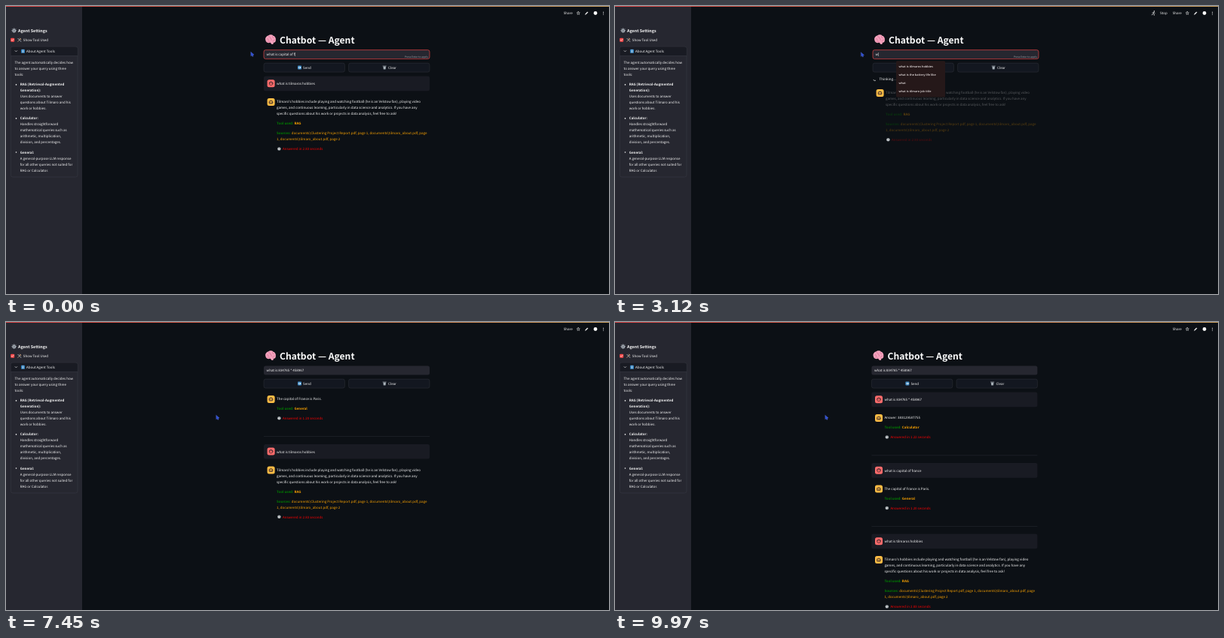
Write an HTML page with a canvas that moves like this. It is 800 by 384 pixels and loops after 10 s.

```html
<!DOCTYPE html>
<html lang="en">
<head>
<meta charset="utf-8">
<title>Chatbot — Agent</title>
<style>
html, body { margin: 0; width: 100%; height: 100%; overflow: hidden; background: #0c1015; }
canvas { display: block; width: 800px; height: 384px; }
</style>
</head>
<body>
<canvas id="stage"></canvas>
<script>
const LOOP = 10000;
const FACE = '"Noto Sans CJK JP", "Noto Sans CJK SC", "Noto Sans CJK KR", "Open Sans", sans-serif';
const FACE_SCALE = 1.117;
const WHITE = '#fafafa', PANEL = '#262730', RED = '#ff4b4b', GREEN = '#008000', ORANGE = '#ffa500';

const canvas = document.getElementById('stage');
const ctx = canvas.getContext('2d');
const ratio = window.devicePixelRatio || 1;
canvas.width = 800 * ratio;
canvas.height = 384 * ratio;

// ---------- timeline ----------
const RUNS = [
  { click: 1350, busy: 1850, fade: 1900, think: 2300, answer: 3450 },
  { click: 6950, busy: 8100, fade: 8050, think: 8900, answer: 9300 }
];
const REFOCUS = 2750, RETYPE = 3100;
const KEYS = [
  { start: 150, step: 150, before: 'what is capital of f', text: 'rance' },
  { start: RETYPE, step: 130, before: '', text: 'what is ' },
  { start: 4330, step: 120, before: 'what is ', text: '834765 ' },
  { start: 5400, step: 120, before: 'what is 834765 ', text: '* 458967' }
];
const POINTER = [
  [0, 325, 61.5], [1000, 325, 61.5], [1350, 428, 77], [1520, 430.5, 73.5], [1900, 430.5, 73.5],
  [2650, 326.5, 62], [6450, 326.5, 62], [6900, 398, 80], [7000, 398, 80], [7380, 279, 124.5]
];
const SUGGESTIONS = ['what is tilmaros hobbies', 'what is the battery life like', 'what', 'what is tilmaro job title'];

const CALC = { q: 'what is 834765 * 458967', a: ['Answer: 383129587755'], tool: 'Calculator', secs: '1.22' };
const FRANCE = { q: 'what is capital of france', a: ['The capital of France is Paris.'], tool: 'General', secs: '1.20' };
const HOBBY = {
  q: 'what is tilmaros hobbies',
  a: ['Tilmaro\'s hobbies include playing and watching football (he is an Velstow fan), playing video',
      'games, and continuous learning, particularly in data science and analytics. If you have any',
      'specific questions about his work or projects in data analysis, feel free to ask!'],
  tool: 'RAG',
  sources: ['documents\\Clustering Project Report.pdf, page 1, documents\\tilmaro_about.pdf, page',
            '1, documents\\tilmaro_about.pdf, page 2'],
  secs: '2.83'
};

const clamp = v => Math.max(0, Math.min(1, v));
const ease = v => v * v * (3 - 2 * v);

function typedAt(t) {
  let value = KEYS[0].before;
  for (const k of KEYS) {
    if (t >= k.start) value = k.before + k.text.slice(0, Math.floor((t - k.start) / k.step) + 1);
  }
  return value;
}

function pointerAt(t) {
  const i = POINTER.findIndex(p => p[0] > t);
  if (i < 0) return POINTER[POINTER.length - 1].slice(1);
  const [t0, x0, y0] = POINTER[i - 1], [t1, x1, y1] = POINTER[i];
  const k = ease((t - t0) / (t1 - t0));
  return [x0 + (x1 - x0) * k, y0 + (y1 - y0) * k];
}

// ---------- drawing helpers ----------
// Text is set ten times larger and scaled down, so advances stay fractional.
function text(str, x, y, { size = 5, color = WHITE, bold = false, align = 'left', font } = {}) {
  ctx.save();
  ctx.translate(x, y + size * 0.34);
  ctx.scale(0.1, 0.1);
  ctx.font = font || `${bold ? 700 : 400} ${size * 10 / FACE_SCALE}px ${FACE}`;
  ctx.textRendering = 'geometricPrecision';
  ctx.textAlign = align;
  ctx.fillStyle = color;
  ctx.fillText(str, 0, 0);
  const width = ctx.measureText(str).width / 10;
  ctx.restore();
  return width;
}

function box(x, y, w, h, r, fill, stroke, line = 0.4) {
  ctx.beginPath();
  ctx.roundRect(x, y, w, h, r);
  if (fill) { ctx.fillStyle = fill; ctx.fill(); }
  if (stroke) { ctx.strokeStyle = stroke; ctx.lineWidth = line; ctx.stroke(); }
}

function dot(x, y, r, fill) {
  ctx.beginPath();
  ctx.arc(x, y, r, 0, 7);
  ctx.fillStyle = fill;
  ctx.fill();
}

function path(d, x, y, { fill, stroke, line = 0.5 }) {
  ctx.save();
  ctx.translate(x, y);
  const p = new Path2D(d);
  ctx.lineCap = ctx.lineJoin = 'round';
  if (fill) { ctx.fillStyle = fill; ctx.fill(p); }
  if (stroke) { ctx.strokeStyle = stroke; ctx.lineWidth = line; ctx.stroke(p); }
  ctx.restore();
}

function star(x, y) {
  let d = '';
  for (let i = 0; i < 10; i++) {
    const r = i % 2 ? 1 : 2.2, a = i * Math.PI / 5;
    d += (i ? 'L' : 'M') + r * Math.sin(a) + ' ' + -r * Math.cos(a);
  }
  path(d + 'Z', x, y, { stroke: WHITE });
}

function gear(x, y) {
  for (let i = 0; i < 8; i++) {
    const a = i * Math.PI / 4, c = Math.cos(a), s = Math.sin(a);
    path(`M${1.8 * c} ${1.8 * s}L${2.8 * c} ${2.8 * s}`, x, y, { stroke: '#c3ccd4', line: 0.9 });
  }
  path('M1.7 0A1.7 1.7 0 1 1 -1.7 0A1.7 1.7 0 1 1 1.7 0', x, y, { stroke: '#c3ccd4', line: 1 });
  dot(x, y, 0.6, '#c3ccd4');
}

function brain(x, y) {
  path('M-6.6 1C-7.6 -2 -5.5 -4.6 -3.2 -5.2C-1 -7 2 -6.6 3.3 -5.4C6 -4.8 7.3 -2 6.9 .6' +
       'C7.2 3 5 4.2 3.8 4C4.2 5.6 3.2 6.6 2 6.2C.8 6 .6 4.6 -.4 3.9C-3 5 -6.2 4 -6.6 1Z', x, y, { fill: '#f4a3bd' });
  path('M-5 -.6C-3.6 -2.2 -2.4 -.6 -3 .8M-2.6 -4C-1 -4.4 .2 -3 -.4 -1.6C.8 -2 1.6 -.6 1 .8' +
       'M2.4 -4.2C2 -2.8 3.2 -2 4.4 -2.4M-4 2.6C-2.6 1.6 -1 2 -.4 3.4M5.6 .4C4.2 0 3 1 3.2 2.4', x, y,
       { stroke: '#d4688f', line: 0.7 });
}

function avatar(x, y, isUser) {
  box(x, y - 5, 10, 10, 2.5, isUser ? '#ff6c6c' : '#ffbd45');
  const ink = { stroke: '#33262a', line: 0.7 };
  if (isUser) {
    path('M2.4 0A2.4 2.4 0 1 1 -2.4 0A2.4 2.4 0 1 1 2.4 0M-2.2 -.6C-.8 -.6 -.2 -1.2 0 -2C.6 -1 1.4 -.7 2.2 -.7', x + 5, y, ink);
  } else {
    path('M-1.9 -1.4H1.9V2.1H-1.9ZM0 -1.4V-2.4M-2.6 .3H-1.9M1.9 .3H2.6M-.8 1.2H.8', x + 5, y, ink);
  }
  dot(x + 4.1, y + 0.3, 0.4, ink.stroke);
  dot(x + 5.9, y + 0.3, 0.4, ink.stroke);
}

function clock(x, y) {
  dot(x, y, 2.3, '#8f979d');
  dot(x, y, 1.6, '#d5d8da');
  path('M0 -1V0L.7 .5', x, y, { stroke: '#444', line: 0.35 });
}

// ---------- page parts ----------
function sidebar() {
  ctx.fillStyle = PANEL;
  ctx.fillRect(0, 0, 101, 384);
  gear(10.7, 32.7);
  text('Agent Settings', 16, 33, { size: 6.05, bold: true });
  box(6.2, 42.8, 5, 5, 1, RED);
  path('M-1.3 0L-.4 1L1.4 -1', 8.7, 45.3, { stroke: '#fff', line: 0.6 });
  path('M-2 2.2L1.6 -1.6M.4 -2.2L2.2 -.6', 17.8, 45.2, { stroke: '#c9a27c', line: 0.8 });
  path('M2 2.2L-1.8 -1.8', 17.8, 45.2, { stroke: '#b9c4cc', line: 0.9 });
  text('Show Tool Used', 22.8, 45.3);

  box(6.4, 54.2, 88.6, 173.8, 2.5, null, '#41434c');
  box(6.6, 54.4, 88.2, 11.8, [2.3, 2.3, 0, 0], '#191b23');
  ctx.fillStyle = '#41434c';
  ctx.fillRect(6.4, 66.1, 88.6, 0.4);
  path('M-1.3 -.6L0 .7L1.3 -.6', 13.4, 60.2, { stroke: WHITE, line: 0.6 });
  box(20, 57.7, 5, 5, 0.8, '#3b88c3');
  path('M0 -.3V1.5M0 -1.5V-1.4', 22.5, 60.2, { stroke: '#fff', line: 0.8 });
  text('About Agent Tools', 27, 60.2);

  ['The agent automatically decides how', 'to answer your query using three', 'tools:']
    .forEach((s, i) => text(s, 11.6, 75.7 + 8 * i));
  const topics = [
    [104.7, 2, ['RAG (Retrieval-Augmented', 'Generation):', 'Uses documents to answer',
      'questions about Tilmaro and his', 'work or hobbies.']],
    [149.7, 1, ['Calculator:', 'Handles straightforward', 'mathematical queries such as',
      'arithmetic, multiplication,', 'division, and percentages.']],
    [194.8, 1, ['General:', 'A general-purpose LLM response',
      'for all other queries not suited for', 'RAG or Calculator.']]
  ];
  for (const [y, heads, lines] of topics) {
    dot(13.5, y + 0.2, 0.8, WHITE);
    lines.forEach((s, i) => text(s, 18.7, y + 8 * i, { bold: i < heads }));
  }
}

function toolbar(t, busy) {
  const glow = ctx.createLinearGradient(0, 0, 800, 0);
  glow.addColorStop(0, RED);
  glow.addColorStop(1, '#f5c070');
  ctx.fillStyle = glow;
  ctx.fillRect(0, 0, 800, 0.8);

  text('Share', 739.7, 9.6);
  star(759.3, 9.6);
  path('M-1.8 1.8L-1.5 .7L1 -1.8L1.8 -1L-.7 1.5Z', 770.3, 9.6, { fill: WHITE, stroke: WHITE, line: 0.3 });
  dot(782, 9.5, 2.4, WHITE);
  for (const dy of [-1.7, 0, 1.7]) dot(792.6, 9.6 + dy, 0.5, WHITE);

  if (!busy) return;
  text('Stop', 723, 9.6);
  const poses = [
    'M.4 -1.2L-.4 .6L1 1.4L.8 3M-.4 .6L-1 1.8L-2.4 2.2M-1.6 -.4L.4 -1.2L1.8 0',
    'M-2.2 -1.4L0 0L2.2 -1.4M0 0V1.4M-2.5 2.4H2.5'
  ];
  const pose = Math.floor(t / 250) % 2;
  path(poses[pose], 714.5, 9.5, { stroke: WHITE, line: 0.6 });
  dot(pose ? 714.5 : 715.4, 7, 0.7, WHITE);
}

function form(value, focused, dirty) {
  brain(351, 44.8);
  text('Chatbot — Agent', 363, 45, { size: 13.6, bold: true });

  box(342, 58.6, 220, 12, 2.5, PANEL, focused ? RED : null, 0.6);
  const width = text(value, 345.6, 64.6);
  if (focused) {
    ctx.fillStyle = WHITE;
    ctx.fillRect(345.9 + width, 62, 0.4, 5);
  }
  if (dirty) text('Press Enter to apply', 560, 67.3, { size: 3.75, color: '#a3a4aa', align: 'right' });

  for (const x of [342, 454.6]) box(x, 76.1, 107.4, 12, 2.5, '#131720', '#3a3d46');
  box(387, 79.6, 5, 5, 0.8, '#3b88c3');
  path('M-1.5 0H1.3M.2 -1.2L1.4 0L.2 1.2', 389.5, 82.1, { stroke: '#fff', line: 0.8 });
  text('Send', 394, 82.1);
  path('M-1.9 -1.6H1.9L1.4 2.4H-1.4Z', 502.2, 82, { fill: '#8f9aa3' });
  path('M-2.2 -2H2.2M-.6 -.6V1.6M.6 -.6V1.6', 502.2, 82, { stroke: '#d0d6da', line: 0.5 });
  text('Clear', 507, 82.1);
}

function history(entries, y, skipQuestion, alpha) {
  const faded = draw => { ctx.globalAlpha = alpha; const out = draw(); ctx.globalAlpha = 1; return out; };
  entries.forEach((e, i) => {
    if (i || !skipQuestion) {
      faded(() => box(342, y - 9.9, 220, 19.7, 2.5, '#191b23'));
      avatar(346.6, y - 0.2, true);
      faded(() => text(e.q, 359, y));
    }
    y += 24.2;
    avatar(346.6, y + 0.4, false);
    faded(() => {
      e.a.forEach((s, n) => text(s, 359, y + 8 * n));
      y += 8 * (e.a.length - 1) + 12.9;
      const w = text('Tool used: ', 359, y, { color: GREEN, bold: true });
      text(e.tool, 359 + w, y, { color: ORANGE, bold: true });
      if (e.sources) {
        y += 13;
        const lead = text('Sources: ', 359, y, { color: GREEN, bold: true });
        e.sources.forEach((s, n) => text(s, n ? 359 : 359 + lead, y + 8 * n, { color: ORANGE }));
        y += 8 * (e.sources.length - 1);
      }
      y += 12.9;
      text(`Answered in ${e.secs} seconds`, 367, y, { color: '#ff0000' });
    });
    clock(362.4, y);
    if (i < entries.length - 1) faded(() => {
      ctx.fillStyle = '#30333b';
      ctx.fillRect(342, y + 24.2, 220, 0.4);
    });
    y += 44.5;
  });
}

function thinking(t) {
  ctx.beginPath();
  const a = t / 750 * 2 * Math.PI;
  ctx.arc(344.8, 97.3, 2.2, a, a + 1.8);
  ctx.strokeStyle = WHITE;
  ctx.lineWidth = 0.7;
  ctx.stroke();
  text('Thinking...', 350.6, 97.4);
}

function suggestions(value) {
  const rows = SUGGESTIONS.filter(s => s.startsWith(value));
  if (!rows.length) return;
  box(373, 73.2, 65, 3 + 11.3 * rows.length, 1.5, '#251819');
  rows.forEach((s, i) => text(s, 376.4, 80.2 + 11.3 * i,
    { size: 3.9, color: '#e8e2e2', font: '600 38.5px "Open Sans", sans-serif' }));
}

function pointer(t) {
  const [x, y] = pointerAt(t);
  path('M0 0L4 3.4L2.3 3.7L3 5.4L1.9 5.8L1.2 4.1L.1 5Z', x, y, { fill: '#2f4fd6', stroke: '#5a78f0', line: 0.4 });
}

function draw(t) {
  ctx.setTransform(ratio, 0, 0, ratio, 0, 0);
  ctx.fillStyle = '#0c1015';
  ctx.fillRect(0, 0, 800, 384);
  sidebar();

  const run = RUNS.find(r => t >= r.click && t < r.answer);
  const waiting = !!run && t >= run.think;
  const focused = t < RUNS[0].click || (t >= REFOCUS && t < RUNS[1].click);
  const dirty = focused && (t < RUNS[0].click || t >= RETYPE);
  const value = typedAt(t);
  const entries = [HOBBY];
  if (t >= RUNS[0].answer) entries.unshift(FRANCE);
  if (t >= RUNS[1].answer) entries.unshift(CALC);

  toolbar(t, run && t >= run.busy);

  ctx.save();
  // The page scrollbar narrows the column once the list overflows.
  if (entries.length > 2) ctx.translate(-1.6, 0);
  form(value, focused, dirty);
  const fade = run ? 1 - 0.67 * ease(clamp((t - run.fade) / 1200)) : 1;
  history(entries, 103.5 - (run ? (waiting ? 12.2 : 25.2) : 0), !!run, fade);
  if (waiting) thinking(t);
  if (focused && t >= RETYPE) suggestions(value);
  ctx.restore();

  pointer(t);
}

const began = performance.now();
function tick() {
  draw((performance.now() - began) % LOOP);
  requestAnimationFrame(tick);
}
tick();
</script>
</body>
</html>
```
